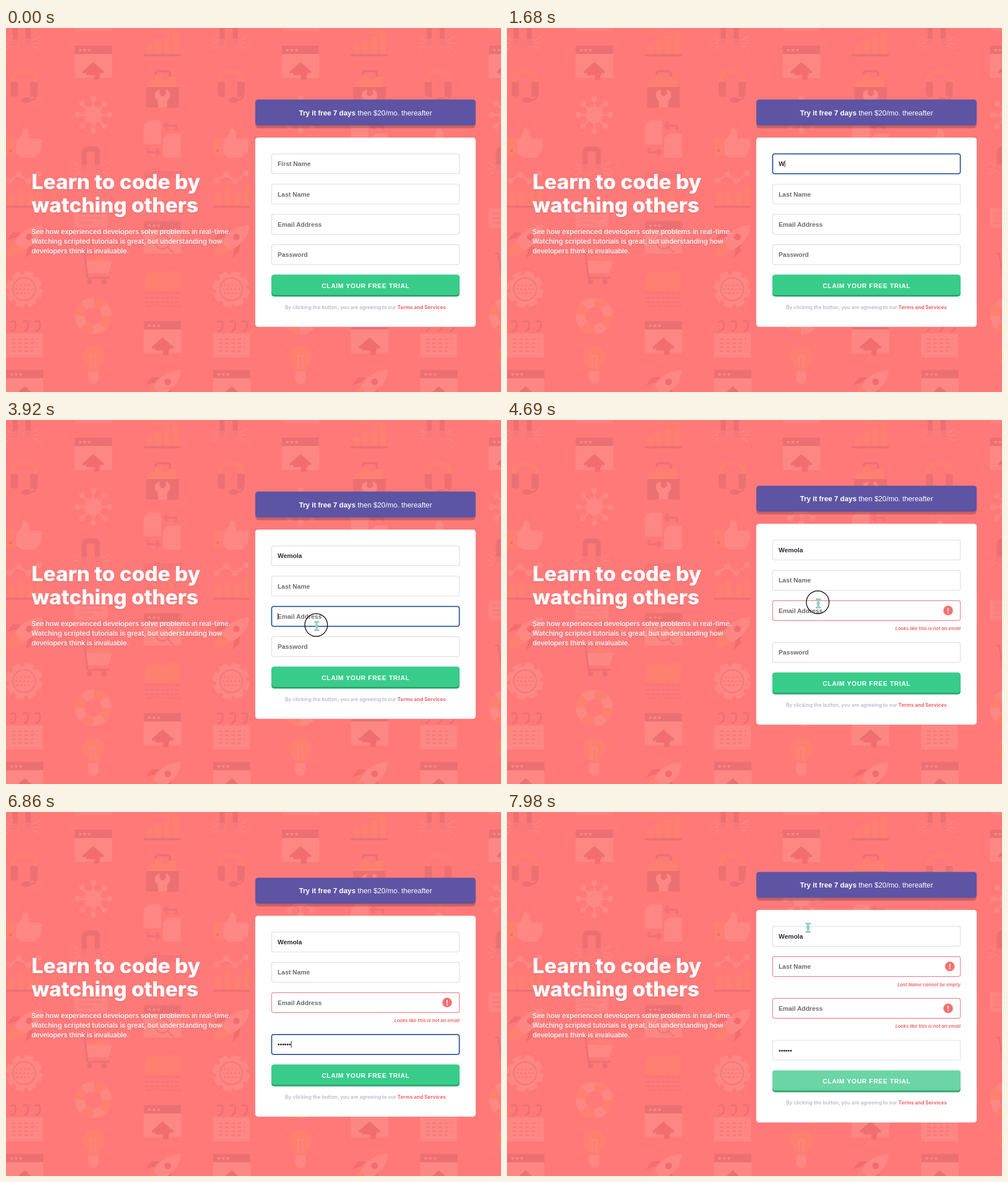
Recreate the animation shown at these times as an HTML page. Size 873x641 px, loop 8 s.

```html
<!DOCTYPE html>
<html lang="en">
<head>
<meta charset="utf-8">
<title>Sign-up form</title>
<style>
html, body { margin: 0; width: 100%; height: 100%; overflow: hidden; background: #ff7979 }
svg { display: block; width: 873px; height: 641px }
text { font-family: "Liberation Sans", Arial, sans-serif }
.inter { font-family: Inter, "Open Sans", sans-serif }
.l { fill: #ff8783 } .d { fill: #ec7072 } .o { fill: #ff7f70 } .r { fill: #f36d6e }
.L, .D, .O { fill: none; stroke-width: 3 }
.L { stroke: #ff8783 } .D { stroke: #ec7072 } .O { stroke: #ff7f70 }
.bold { font-weight: 700; font-size: 11.25px }
.error { font: italic 700 8.1px Inter, "Open Sans", sans-serif; fill: #f3706f; text-anchor: end }
</style>
</head>
<body>
<svg viewBox="0 0 873 641">
  <defs>
    <g id="window">
      <rect class="l" width="66" height="57"/><rect class="d" width="66" height="15"/>
      <g class="l"><circle cx="10" cy="8" r="2.3"/><circle cx="18" cy="8" r="2.3"/><circle cx="26" cy="8" r="2.3"/></g>
    </g>
    <g id="home">
      <use href="#window"/>
      <path class="r" d="M20 45L33 33L46 45V52H44V60H34V52H20Z"/>
      <path class="D" style="stroke-width:5" d="M15 48L33 32L51 48"/>
    </g>
    <g id="magnet">
      <path class="D" style="stroke-width:9" d="M16 43V10Q16 5 21 5H34Q39 5 39 10V43"/>
      <path class="l" d="M11 32H21V43H11ZM34 32H44V43H34Z" opacity=".4"/>
      <path class="L" style="stroke-width:2" d="M8 35L-2 28M7 40H-3M8 45L-2 51M48 35L60 28M49 40H61M48 45L60 51"/>
    </g>
    <g id="rocket">
      <path class="o" d="M-31 29Q-26 4 -10 -2L4 12Q-4 25 -31 29Z"/>
      <path class="r" d="M-14 -5L-31 0L-20 -14L-5 -14ZM6 14L2 31L15 20L16 4Z"/>
      <path class="l" d="M-16 3Q-2 -24 32 -27Q30 4 -2 17Z"/>
      <circle class="r" cx="9" cy="-6" r="6"/>
    </g>
    <g id="graph">
      <path class="o" d="M4 35H14V58H4ZM21 28H31V58H21ZM38 34H48V58H38ZM53 22H63V58H53Z"/>
      <rect class="d" y="58" width="65" height="3.5"/>
      <path class="L" d="M6 14L23 3L39 15L58 1"/>
      <g class="l"><circle cx="6" cy="14" r="5"/><circle cx="23" cy="3" r="5"/><circle cx="39" cy="15" r="5"/><circle cx="58" cy="1" r="5"/></g>
    </g>
    <pattern id="icons" width="365.2" height="641" patternUnits="userSpaceOnUse">
      <!-- left column -->
      <use href="#magnet" y="-13"/>
      <path class="O" style="stroke-width:6" d="M11 100V95Q11 76 32 76T53 95V100"/>
      <path class="d" d="M8 95H21V121H14Q8 121 8 114ZM43 95H56V114Q56 121 50 121H43Z"/>
      <path class="D" d="M53 119Q52 127 40 127"/><ellipse class="d" cx="36" cy="127" rx="9" ry="5"/>
      <rect class="o" y="193" width="16" height="33"/>
      <path class="l" d="M18 198Q30 190 29 178Q42 174 41 195H60Q67 199 62 204Q67 209 61 212Q63 219 57 221Q57 228 49 228H28L18 222Z"/>
      <circle class="r" cx="8" cy="216" r="2.5"/>
      <path class="O" d="M35 170V162M22 174L17 168M47 174L52 168"/>
      <use href="#graph" y="255"/>
      <use href="#rocket" x="32" y="374"/>
      <circle class="L" cx="32" cy="460" r="28" stroke-dasharray="15 7" style="stroke-width:9"/>
      <circle class="l" cx="32" cy="460" r="27"/><circle class="D" cx="32" cy="460" r="20" opacity=".5"/>
      <path class="D" stroke-dasharray="4 3" d="M18 453H47M16 460H49M18 467H47" opacity=".5"/>
      <rect class="l" y="538" width="65" height="42"/>
      <path class="D" d="M7 518Q18 512 17 524Q17 533 9 534M29 518Q40 512 39 524Q39 533 31 534M50 518Q61 512 60 524Q60 533 52 534"/>
      <path class="D" stroke-dasharray="7 4" d="M10 548H56M10 555H56M10 562H56M10 569H48" opacity=".5"/>
      <use href="#home" y="602"/>
      <!-- middle column -->
      <rect class="l" x="122" width="65" height="6" opacity=".6"/>
      <use href="#home" x="121" y="31"/>
      <path class="L" d="M154 124V182M125 153H183M134 133L174 173M174 133L134 173"/>
      <circle class="l" cx="154" cy="153" r="15"/>
      <g class="l"><circle cx="154" cy="125" r="5"/><circle cx="154" cy="181" r="5"/><circle cx="126" cy="153" r="5"/><circle cx="182" cy="153" r="5"/><circle cx="134" cy="133" r="5"/><circle cx="174" cy="133" r="5"/><circle cx="134" cy="173" r="5"/><circle cx="174" cy="173" r="5"/></g>
      <use href="#magnet" x="122" y="208"/>
      <rect class="l" x="121" y="318" width="58" height="34" opacity=".7"/>
      <path class="D" d="M128 327H170M128 335H170M128 343H156" opacity=".4"/>
      <path class="o" d="M146 414V402L156 406L163 394L172 405L183 402V414Z"/>
      <path class="l" d="M140 410H187L181 432H144Z"/>
      <path class="D" d="M132 397H138L144 440H183"/><g class="d"><circle cx="147" cy="447" r="5"/><circle cx="173" cy="447" r="5"/></g>
      <circle class="L" cx="154" cy="507" r="24" style="stroke-width:17"/>
      <circle class="O" cx="154" cy="507" r="24" style="stroke-width:17" stroke-dasharray="18.85"/>
      <path class="o" d="M146 603Q146 597 139 592A20 20 0 1 1 169 592Q162 597 162 603Z"/>
      <path class="l" d="M145 604H163V620L158 626H150L145 620Z"/>
      <path class="L" d="M150 598V577H158V598" opacity=".7"/>
      <path class="O" d="M127 580H120M181 580H188M134 562L128 556M174 562L180 556M133 598L127 603M175 598L181 603"/>
      <!-- right column -->
      <path class="o" d="M248 30H259V46H248ZM263 20H274V46H263ZM279 14H290V46H279ZM294 6H305V46H294Z"/>
      <path class="O" d="M250 13L268 3L284 9L303 -4"/><rect class="d" x="243" y="46" width="65" height="4"/>
      <path class="D" d="M264 91V80Q264 76 268 76H285Q289 76 289 80V91" style="stroke-width:4"/>
      <path class="o" d="M250 93H262V83H275V91H285V86H300V104H250Z"/>
      <rect class="d" x="247" y="104" width="58" height="36"/>
      <path class="l" d="M268 140V129Q260 122 264 112L271 108V117L276 121L282 117V108L288 112Q292 122 284 129V140Z"/>
      <path class="l" d="M243 171L252 163H274V205H243ZM277 194L286 186H308V228H277Z"/>
      <path class="D" d="M280 172H300V180M285 166L279 172L285 178M270 219H250V211M265 213L271 219L265 225" style="stroke-width:4" opacity=".7"/>
      <path class="d" d="M243 252H309V265H243Z" opacity=".45"/>
      <circle class="O" cx="276" cy="288" r="15" style="stroke-width:8" stroke-dasharray="9 4"/>
      <use href="#window" x="243" y="340"/>
      <g opacity=".7"><circle class="D" cx="276" cy="377" r="12"/><path class="D" d="M285 386L295 396"/></g>
      <path class="o" d="M245 462V444Q245 429 258 431Q274 425 281 434Q293 423 304 430Q312 437 306 446Q310 457 300 462Z"/>
      <path class="D" d="M244 467H308M244 475H308M244 483H303M248 490H308" stroke-dasharray="9 2 5 2" opacity=".5"/>
      <use href="#home" x="243" y="516"/>
      <use href="#rocket" x="276" y="629"/>
    </pattern>
    <filter id="soft" x="-5%" y="-5%" width="110%" height="115%"><feDropShadow dx="0" dy="1" stdDeviation=".6" flood-opacity=".22"/></filter>
    <filter id="blur" x="-2%" y="-10%" width="104%" height="120%"><feGaussianBlur stdDeviation=".7"/></filter>
  </defs>

  <rect width="873" height="641" fill="#ff7979"/>
  <rect width="873" height="641" fill="url(#icons)"/>

  <g fill="#fff" filter="url(#soft)">
    <g font-size="36.5" font-weight="800">
      <text class="inter" x="45" y="284">Learn to code by</text>
      <text class="inter" x="45" y="324.5">watching others</text>
    </g>
    <g font-size="11.92" font-weight="500">
      <text class="inter" x="45" y="362.5">See how experienced developers solve problems in real-time.</text>
      <text class="inter" x="45" y="379.5">Watching scripted tutorials is great, but understanding how</text>
      <text class="inter" x="45" y="396.5">developers think is invaluable.</text>
    </g>
  </g>

  <g id="banner">
    <rect x="440" y="131" width="388" height="45.5" rx="5" opacity=".2" filter="url(#blur)"/>
    <rect x="439.6" y="126" width="388.8" height="45.7" rx="5" fill="#5e54a4"/>
    <text x="634" y="153.5" font-size="12.65" fill="#fff" text-anchor="middle"><tspan font-weight="700">Try it free 7 days</tspan> then $20/mo. thereafter</text>
  </g>
  <rect id="card" x="439.6" y="193" width="388.8" rx="5" fill="#fff"/>
  <g id="fields"></g>
  <g id="footer">
    <rect x="468" y="434.5" width="332" height="38.5" rx="5" fill="#2aa66d"/>
    <rect id="button" x="468" y="434.5" width="332" height="35.5" rx="5"/>
    <text class="bold" x="634.3" y="457.5" fill="#fff" letter-spacing=".7" text-anchor="middle">CLAIM YOUR FREE TRIAL</text>
    <text class="inter" x="634" y="494.8" font-size="8.83" font-weight="600" fill="#bab7d4" text-anchor="middle">By clicking the button, you are agreeing to our <tspan fill="#f3656a" font-weight="700">Terms and Services</tspan></text>
  </g>
  <g id="cursor">
    <g fill="none" stroke-linecap="round">
      <path d="M-3 -7.3Q0 -7.3 0 -5Q0 -7.3 3 -7.3M0 -5V5M-3 7.3Q0 7.3 0 5Q0 7.3 3 7.3M-1.5 0H1.5" stroke="#58ada2" stroke-width="2.8"/>
      <path d="M-3 -7.3Q0 -7.3 0 -5Q0 -7.3 3 -7.3M0 -5V5M-3 7.3Q0 7.3 0 5Q0 7.3 3 7.3M-1.5 0H1.5" stroke="#bfe4de" stroke-width="1.1"/>
    </g>
    <circle id="ring" cx="-1" cy="-2" r="20" fill="none" stroke="#111" stroke-width="1.4"/>
  </g>
</svg>

<script>
const $ = id => document.getElementById(id);
const LOOP = 8000, STEP = 70, ERROR_HEIGHT = 20.4;

// [start, end, x0, y0, x1, y1]; the pointer rests between moves
const moves = [
  [70, 630, 750, 606, 592, 237],
  [3290, 3780, 592, 254, 548, 363],
  [4060, 4550, 548, 363, 549, 323],
  [4830, 5530, 549, 323, 547, 409],
  [7210, 7420, 547, 409, 540, 464],
  [7630, 7980, 540, 464, 531, 204],
];
const shown = [[70, 1610], [3290, 6440], [7210, LOOP]];
const clicks = [[770, 1050], [3780, 4060], [4550, 4830], [5810, 5950], [7490, 7630]];

const fields = [
  { label: 'First Name', focus: [980, 3850], value: 'Wemola', keys: [1470, 2170, 2450, 2520, 2730, 2870] },
  { label: 'Last Name', error: 'Last Name cannot be empty', errorAt: 7560, iconX: 781 },
  { label: 'Email Address', focus: [3850, 4620], error: 'Looks like this is not an email', errorAt: 4620, iconX: 778 },
  { label: 'Password', focus: [5880, 7560], value: '••••••', keys: [6370, 6580, 6650, 6720, 6860, 6860] },
];

const within = (t, [a, b]) => t >= a && t < b;
const shift = (el, x, y) => el.setAttribute('transform', `translate(${x} ${y})`);
const show = (el, on) => el.setAttribute('visibility', on ? 'visible' : 'hidden');

for (const f of fields) {
  const g = document.createElementNS('http://www.w3.org/2000/svg', 'g');
  g.innerHTML = `<rect x="468.5" y="-17.5" width="331" height="35" rx="3.5" fill="#fff"/>
    <text class="bold" x="479" y="4"></text>
    <path d="M0 -6V6" stroke="#333" stroke-width="1"/>
    <g><circle cx="${f.iconX}" r="8.5" fill="#f9706f"/>
      <path d="M${f.iconX} -4.5V1.3M${f.iconX} 3V4.8" stroke="#fff" stroke-width="1.7"/>
      <text class="error" x="800" y="34.7">${f.error || ''}</text></g>`;
  $('fields').append(g);
  f.group = g;
  [f.box, f.text, f.caret, f.warning] = g.children;
}

function drawField(f, t, y) {
  const focused = !!f.focus && within(t, f.focus);
  const invalid = t >= f.errorAt;
  const typed = f.keys ? f.value.slice(0, f.keys.filter(k => t >= k).length) : '';
  shift(f.group, 0, y);
  f.box.setAttribute('stroke', focused ? '#1d4f96' : invalid ? '#e5818a' : '#dedede');
  f.box.setAttribute('stroke-width', focused ? 1.8 : 1.2);
  f.text.textContent = typed || f.label;
  f.text.setAttribute('fill', typed ? '#2d2c33' : '#6d6d6f');
  shift(f.caret, 479.5 + (typed ? f.text.getComputedTextLength() : 0), 0);
  show(f.caret, focused);
  show(f.warning, invalid);
}

function drawCursor(t) {
  const [start, end, x0, y0, x1, y1] = moves.findLast(m => t >= m[0]) || moves[0];
  const p = Math.min(1, Math.max(0, (t - start) / (end - start)));
  const e = p * p * (3 - 2 * p);
  shift($('cursor'), x0 + (x1 - x0) * e, y0 + (y1 - y0) * e);
  $('cursor').setAttribute('display', shown.some(s => within(t, s)) ? 'inline' : 'none');
  show($('ring'), clicks.some(c => within(t, c)));
}

function render() {
  const t = Math.floor((performance.now() % LOOP + .5) / STEP) * STEP;
  const extra = fields.filter(f => t >= f.errorAt).length * ERROR_HEIGHT;
  const top = -extra / 2;
  shift($('banner'), 0, top);
  shift($('card'), 0, top);
  $('card').setAttribute('height', 333.3 + extra);
  let y = 239.2 + top;
  for (const f of fields) {
    drawField(f, t, y);
    y += 53.3 + (t >= f.errorAt ? ERROR_HEIGHT : 0);
  }
  shift($('footer'), 0, extra / 2);
  $('button').setAttribute('fill', t >= 7420 ? '#6bd5a5' : '#38cc8b');
  drawCursor(t);
  requestAnimationFrame(render);
}
render();
</script>
</body>
</html>
```
